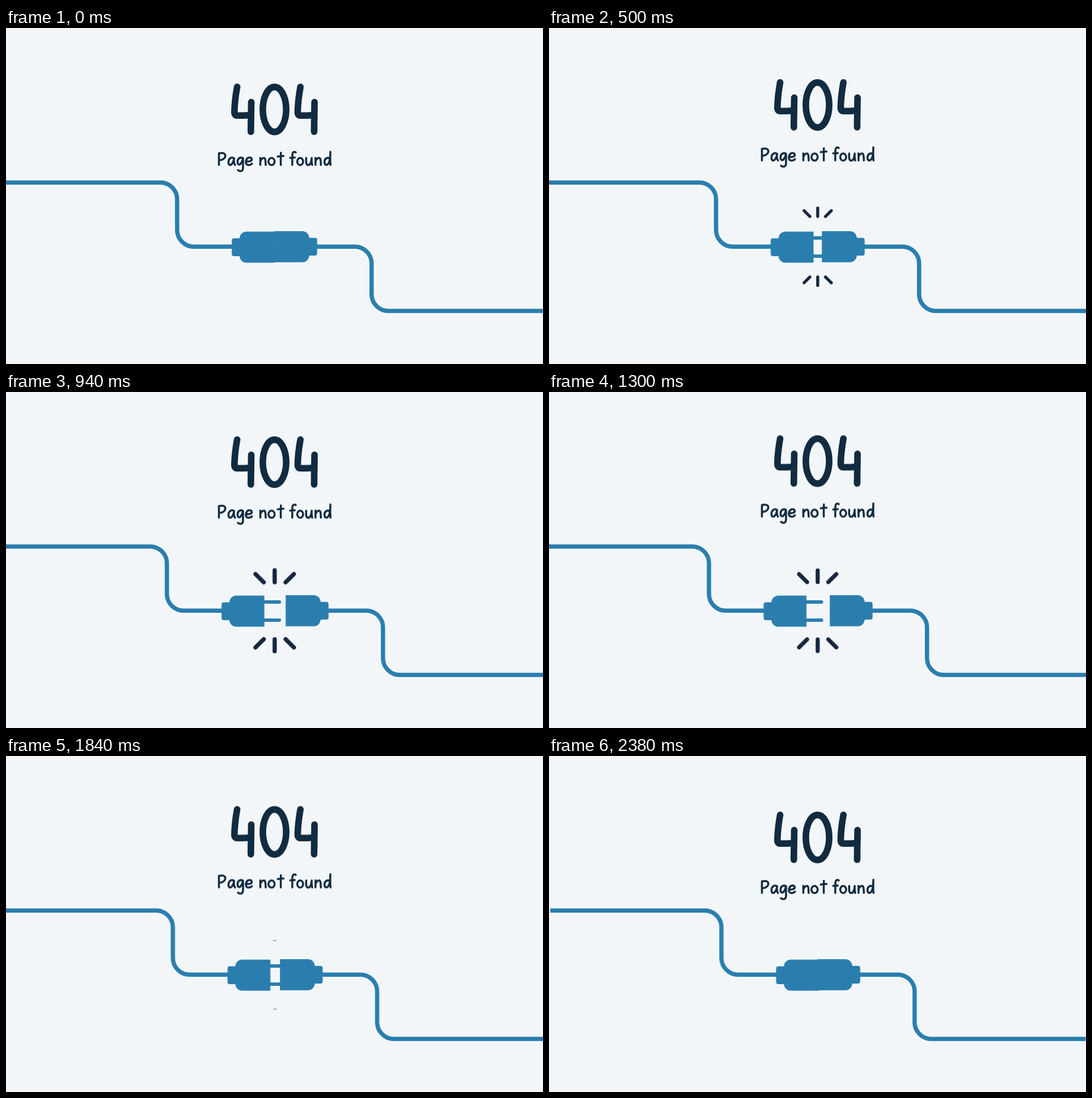
An HTML page that plays this animation: 947x592 px, repeating every 2.4 s.

```html
<!DOCTYPE html>
<html lang="en">
<head>
<meta charset="utf-8">
<title>404 Page not found</title>
<style>
  html, body { margin: 0; width: 100%; height: 100%; overflow: hidden; background: #f2f6f9; }
  svg { display: block; width: 947px; height: 592px; }
  .plug { fill: #2a7eae; }
  .line { fill: none; stroke: #2a7eae; stroke-width: 7.5; }
  .prong { fill: none; stroke: #2a7eae; stroke-width: 6; stroke-linecap: round; }
  .spark { fill: none; stroke: #16263f; stroke-width: 7.4; stroke-linecap: round; }
  .ink { fill: none; stroke: #112b40; stroke-linecap: round; stroke-linejoin: round; }
  /* selectable text beneath the hand lettering */
  text { fill: transparent; text-anchor: middle; font-family: "Open Sans", sans-serif; }
</style>
</head>
<body>
<svg viewBox="0 0 947 592">
  <defs>
    <g id="four">
      <path d="M407.6 103.8C404.8 119 403 135 402.8 149Q402.8 154 407.5 154.2C416 154.4 424 154.3 431.5 153.2"/>
      <path d="M432.5 130.5C432.4 148 431.8 166 431.8 182.8"/>
    </g>
    <path id="n" d="M448.5 228.8V241.3M448.7 234.5C450.3 230.8 453 228.6 455.3 229C458 229.6 457.6 236 458 241.3"/>
    <path id="rays" d="M0-10.6V10.6M-33.9-3.8L-19.3 10.7M33.9-3.8L19.3 10.7"/>
  </defs>

  <g id="title">
    <text x="473.5" y="188" font-size="96">404</text>
    <text x="473.5" y="242" font-size="30">Page not found</text>
    <g class="ink" stroke-width="11.6" aria-hidden="true">
      <use href="#four"/>
      <ellipse cx="473.5" cy="143.5" rx="20.6" ry="39.6"/>
      <use href="#four" x="111.6"/>
    </g>
    <g class="ink" stroke-width="3.5" aria-hidden="true">
      <path d="M375.5 220.8V241.3M375.5 221C384 218.5 387.6 222 386.6 226.5C385.6 230.6 381 233 375.8 233"/>
      <path d="M402 229.5C398 226.5 392.6 229.5 392.3 236C392.2 241.5 395.2 242.6 398 240C400.5 237.6 401.5 234 402.2 229.5C401.6 234 401.8 239 404 241.3"/>
      <path d="M418 229.5C413 226.5 408.5 230 408.3 235.5C408.2 241 411.5 241.8 414 239C416.5 236 417.5 232 418 229.5V246C418 252.5 413.5 253.6 409 250.5"/>
      <path d="M423.8 235C428 236 434 234.5 433.4 231C432.8 227.6 427 227.2 424.5 231C421.5 236 423 241.5 427.5 241.5C430.5 241.5 432.4 240.4 433.8 239"/>
      <use href="#n"/>
      <ellipse cx="468.3" cy="235.3" rx="5.5" ry="6.3"/>
      <path d="M484.8 219.8C484.4 228 484.5 235 484.6 241.3M479.2 226.6L489.4 225.6"/>
      <path d="M511 219.2C507.6 216.8 505.2 219 505 223.5L504.8 241.3M501.2 228.8L509.4 228.2"/>
      <ellipse cx="518.8" cy="235.3" rx="5.2" ry="6.3"/>
      <path d="M529.4 229C529 236 529 241.5 533 241.5C536.5 241.5 538.4 237 539.1 229C538.8 234 539 238 540 241.3"/>
      <use href="#n" x="97.3"/>
      <path d="M572 230.5C567 226.8 561.8 230 561.6 236C561.5 241.4 565 242.6 568 239.6C570.8 236.6 571.8 232 572 218C571.6 228 571.6 236 572.3 241.3"/>
    </g>
  </g>

  <g id="left">
    <path class="line" d="M0 272.25H272.3a29.5 29.5 0 0 1 29.5 29.5V355.75a29.5 29.5 0 0 0 29.5 29.5H400"/>
    <rect class="plug" x="398.2" y="370.5" width="24" height="31.5" rx="4"/>
    <path class="plug" d="M473.7 358.8H424a12 12 0 0 0-12 12V401.4a12 12 0 0 0 12 12H473.7Z"/>
    <path class="prong" d="M470 370H500.2M470 402H500.2"/>
  </g>

  <g id="right">
    <path class="line" d="M546 385.25H615.2a29.5 29.5 0 0 1 29.5 29.5V469a29.5 29.5 0 0 0 29.5 29.5H946.6"/>
    <rect class="plug" x="524.7" y="369.7" width="24" height="31.3" rx="4"/>
    <path class="plug" d="M473.2 358H522.7a12 12 0 0 1 12 12V400.7a12 12 0 0 1-12 12H473.2Z"/>
  </g>

  <g transform="translate(473.8 324.6)"><use class="spark" href="#rays"/></g>
  <g transform="translate(473.8 446.2) scale(1 -1)"><use class="spark" href="#rays"/></g>
</svg>
<script>
  const timing = { duration: 2400, iterations: Infinity };

  // steps: [offset, transform]
  function loop(el, steps) {
    const frames = steps.map(([offset, transform]) => ({ offset, transform, easing: 'ease-in-out' }));
    el.animate(frames, timing);
  }

  const slide = (x, y = 0) => `translate(${x}px, ${y}px)`;
  const get = id => document.getElementById(id);

  loop(get('title'), [[0, slide(0)], [0.5, slide(0, -22)], [1, slide(0)]]);
  loop(get('left'), [[0, slide(0)], [0.5, slide(-20)], [1, slide(2.3)]]);
  loop(get('right'), [[0, slide(0)], [0.5, slide(22.2)], [1, slide(0)]]);

  for (const el of document.querySelectorAll('.spark')) {
    loop(el, [[0, 'scale(0)'], [1 / 3, 'scale(1)'], [0.5, 'scale(1)'], [5 / 6, 'scale(0)'], [1, 'scale(0)']]);
  }
</script>
</body>
</html>
```
